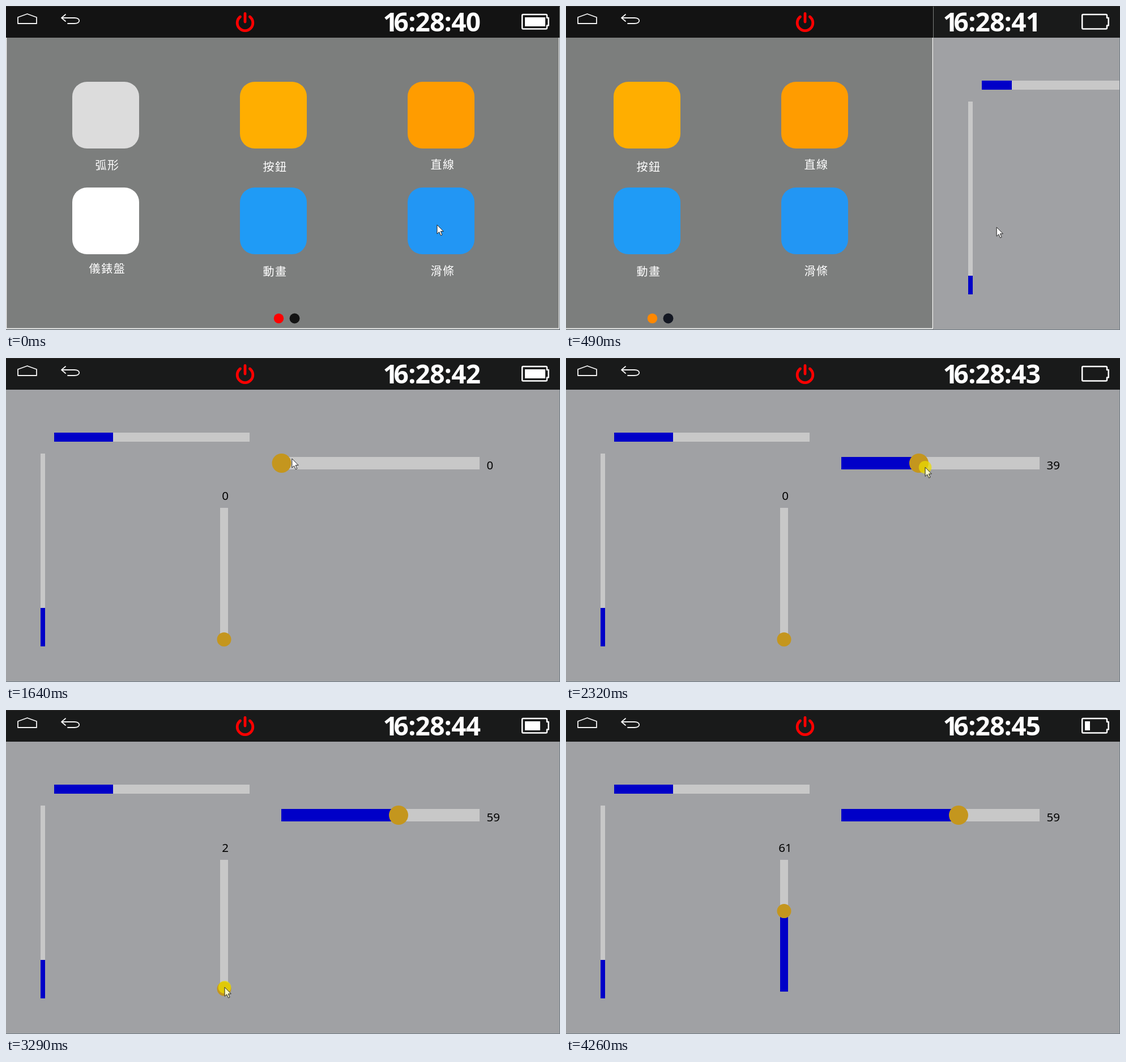
An HTML page for the animation above (4.41 s loop, 978 by 573 pixels).

```html
<!DOCTYPE html>
<html lang="zh-Hant">
<head>
<meta charset="utf-8">
<title>Touch panel</title>
<style>
  html, body { margin: 0; width: 100%; height: 100%; overflow: hidden; background: #a0a1a4; }
  svg { display: block; width: 978px; height: 573px; }
  .label { font: 20px "Noto Sans CJK TC", "Noto Sans CJK", sans-serif; letter-spacing: 1.6px; fill: #fff; text-anchor: middle; }
  .clock { font: bold 46px "Noto Sans", "Open Sans", sans-serif; letter-spacing: -.7px; fill: #fff; }
  .value { font: 20.5px "Noto Sans", "Open Sans", sans-serif; fill: #000; }
  .track { fill: #c8c8c8; }
  .fill { fill: #0000c8; }
  .knob { fill: #c4961e; }
  .line { fill: none; stroke: #f4f4f4; stroke-width: 1.8; stroke-linejoin: round; stroke-linecap: round; }
</style>
</head>
<body>
<svg viewBox="0 0 978 573">
  <g id="sliders">
    <rect width="978" height="573" fill="#a0a1a4"/>
    <rect width="978" height="56" fill="#191a1a"/>
    <rect class="track" x="85" y="132" width="345" height="16"/>
    <rect class="fill" id="barH" x="85" y="132" height="16"/>
    <rect class="track" x="61" y="169" width="8" height="341"/>
    <rect class="fill" id="barV" x="61" width="8"/>
    <rect class="track" x="486" y="175" width="350" height="22"/>
    <rect class="fill" id="fillH" x="486" y="175" height="22"/>
    <circle class="knob" id="knobH" cy="186" r="17"/>
    <text class="value" id="valueH" x="848.5" y="197"></text>
    <rect class="track" x="378" y="265" width="14" height="233"/>
    <rect class="fill" id="fillV" x="378" width="14"/>
    <circle class="knob" id="knobV" cx="385" r="12.5"/>
    <text class="value" id="valueV" x="387" y="251" text-anchor="middle"></text>
  </g>

  <g id="home">
    <rect width="978" height="573" fill="#7c7e7d"/>
    <path d="M.5 56V570.5H976.5V56" fill="none" stroke="#fff" stroke-width="1.4"/>
    <rect width="977" height="56" fill="#131313"/>
    <g id="tiles"></g>
    <circle id="dotA" cx="481.5" cy="552.5" r="8.7"/>
    <circle id="dotB" cx="509.5" cy="552.5" r="9"/>
  </g>

  <path d="M0 .5H978" stroke="#2b2b2b"/>
  <path d="M0 572.5H978M977.5 56V573" stroke="#717a83"/>

  <path class="line" d="M21 31V20L37.5 14L54 20V31Z"/>
  <path class="line" d="M105 15L98 21L105 27M98 21H121C132 21 132 31 121 31H109"/>
  <g fill="none" stroke="#f00" stroke-width="4.8" stroke-linecap="round">
    <path d="M413.5 19A13.8 13.8 0 1 0 430.5 19"/>
    <path d="M422 13.5V28"/>
  </g>
  <text class="clock" x="665.4" y="45">1<tspan id="clock" dx="-6.5"></tspan></text>
  <path d="M913 15H953Q955 15 955 17V21H957.7V34.5H955V38.5Q955 40.5 953 40.5H913Q911.2 40.5 911.2 38.5V17Q911.2 15 913 15Z"
        fill="none" stroke="#fff" stroke-width="2.5" stroke-linejoin="round"/>
  <rect id="charge" x="916" y="20" height="16" fill="#fff"/>

  <g id="pointer">
    <circle id="press" r="11.3" fill="#eadc00" fill-opacity=".72"/>
    <path id="arrow" d="M0 0V16L3.7 12.6L6.5 18.8L9 17.7L6.3 11.6H11.3Z" stroke="#222"/>
  </g>
</svg>
<script>
const $ = id => document.getElementById(id);
const set = (id, attrs) => {
  for (const name in attrs) $(id).setAttribute(name, attrs[name]);
};
const clamp = (n, min, max) => Math.min(max, Math.max(min, n));
const progress = (t, start, length) => clamp((t - start) / length, 0, 1);
const smooth = u => u * u * (3 - 2 * u);

const LOOP = 4410, REFRESHES = 27;
const SLIDE_AT = 410;
const DRAG_H = { from: 1900, to: 2534 };
const DRAG_V = { from: 3200, to: 3850 };

// Stops of the pointer; it eases from one to the next.
const STOPS = [
  { t: 0, x: 761, y: 387 },
  { t: 660, x: 760, y: 392 },
  { t: 1310, x: 400, y: 186 },
  { t: 1640, x: 505, y: 178 },
  { t: DRAG_H.from, x: 497, y: 190 },
  { t: DRAG_H.to, x: 704, y: 195 },
  { t: DRAG_V.from, x: 386, y: 494.5 },
  { t: DRAG_V.to, x: 386, y: 352.5 }
];

function pointerAt(t) {
  let { x, y } = STOPS[0];
  STOPS.slice(1).forEach((stop, i) => {
    const u = smooth(progress(t, STOPS[i].t, stop.t - STOPS[i].t));
    x += (stop.x - x) * u;
    y += (stop.y - y) * u;
  });
  return { x, y };
}

const TILES = [
  ['#dcdcdc', '弧形', 288.5], ['#ffae00', '按鈕', 291.5], ['#ff9c00', '直線', 287.5],
  ['#fff', '儀錶盤', 472], ['#1f9bf6', '動畫', 476.5], ['#2296f4', '滑條', 475.5]
];
$('tiles').innerHTML = TILES.map(([color, name, baseline], i) => {
  const x = 117 + 296 * (i % 3), y = 134 + 187 * Math.floor(i / 3);
  return `<rect x="${x}" y="${y}" width="118" height="118" rx="26" fill="${color}"/>
    <text class="label" x="${x + 62}" y="${baseline}">${name}</text>`;
}).join('');

function draw(t) {
  const slide = Math.round(978 * progress(t, SLIDE_AT, 238));
  set('home', { transform: `translate(${-slide})` });
  set('sliders', { transform: `translate(${978 - slide})` });
  set('dotA', { fill: slide ? '#ff8800' : '#f00' });
  set('dotB', { fill: slide ? '#131722' : '#131313' });

  const grow = progress(t, SLIDE_AT, 157);
  const barV = Math.floor(68 * grow) - (grow < 1);
  set('barH', { width: Math.round(104 * grow) });
  set('barV', { y: 510 - barV, height: barV });

  // A slider follows the pointer during its drag and then keeps its value.
  const h = Math.round((pointerAt(clamp(t, DRAG_H.from, DRAG_H.to)).x - 497) / 3.5);
  set('fillH', { width: 3.5 * h });
  set('knobH', { cx: 486.5 + 3.5 * h });
  $('valueH').textContent = h;

  const v = Math.round((494.5 - pointerAt(clamp(t, DRAG_V.from, DRAG_V.to)).y) / 2.33);
  set('fillV', { y: 498 - 2.33 * v, height: 2.33 * v });
  set('knobV', { cy: 497.7 - 2.33 * v });
  $('valueV').textContent = v;

  $('clock').textContent = `6:28:${40 + Math.floor((t + 850) / 1000)}`;
  set('charge', { width: 9 * (Math.floor((t + 1610) / 360) % 5) });

  const { x, y } = pointerAt(t);
  const tapping = t > 150 && t < SLIDE_AT;
  const dragging = t > DRAG_H.from && t < DRAG_H.to || t > DRAG_V.from;
  const pressed = tapping || dragging;
  set('pointer', {
    transform: `translate(${x} ${y})`,
    visibility: t < DRAG_V.to ? 'visible' : 'hidden'
  });
  set('press', { opacity: pressed ? 1 : 0 });
  set('arrow', { fill: pressed ? '#ffffc8' : '#fff' });
}

const start = performance.now();
function frame() {
  const now = (performance.now() - start) % LOOP;
  draw(Math.floor(now * REFRESHES / LOOP) * LOOP / REFRESHES);
  requestAnimationFrame(frame);
}
frame();
</script>
</body>
</html>
```
